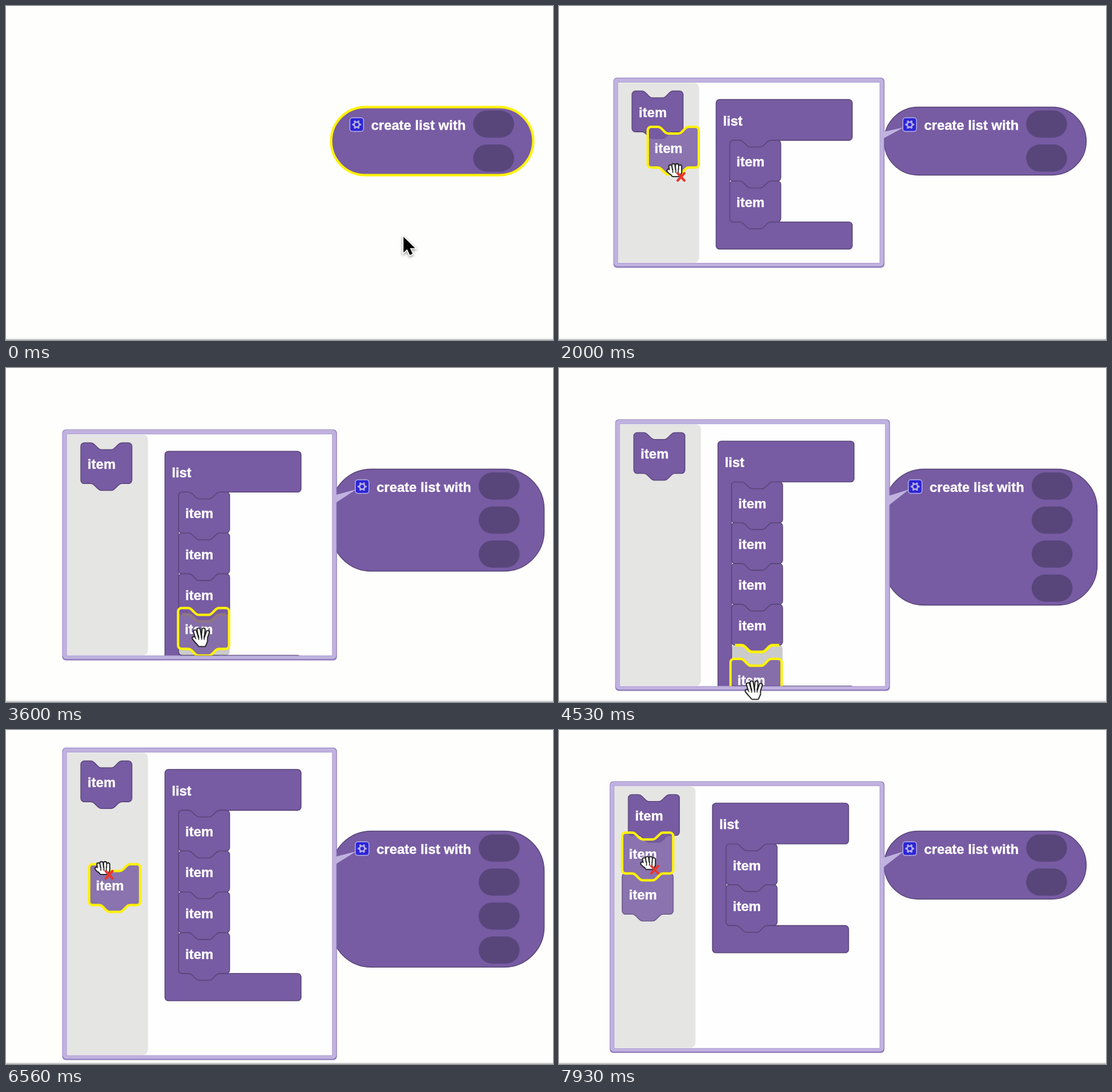
An HTML page with a canvas for the animation above (8 s loop, 900 by 550 pixels).

```html
<!DOCTYPE html>
<html>
<head>
<meta charset="utf-8">
<style>
html, body { margin: 0; width: 100%; height: 100%; overflow: hidden; background: #fefefd; }
canvas { display: block; }
</style>
</head>
<body>
<canvas id="stage" width="900" height="550"></canvas>
<script>
const ctx = document.getElementById('stage').getContext('2d');
const LOOP = 8000, SCALE = 1.4, ROW = 48 * SCALE, LAG = 40, SNAP = 70;
const PURPLE = '#775ba3', EDGE = '#594678', SLOT = '#58467a', YELLOW = '#fff200', LAVENDER = '#c0b2df';

// Block outlines in workspace units
const notch = d => `c${2 * d} 0 ${3 * d} 1 ${4 * d} 2l${4 * d} 4c${d} 1 ${2 * d} 2 ${4 * d} 2h${12 * d}` +
  `c${2 * d} 0 ${3 * d} -1 ${4 * d} -2l${4 * d} -4c${d} -1 ${2 * d} -2 ${4 * d} -2`;
const ITEM = new Path2D(`M0 4a4 4 0 0 1 4-4h8${notch(1)}H56a4 4 0 0 1 4 4V44a4 4 0 0 1-4 4H48${notch(-1)}H4a4 4 0 0 1-4-4z`);
const JOINT = new Path2D(`M4 0h8${notch(1)}H56`);
const listPath = n => new Path2D(`M0 4a4 4 0 0 1 4-4H156a4 4 0 0 1 4 4V44a4 4 0 0 1-4 4H64${notch(-1)}H20a4 4 0 0 0-4 4` +
  `V${44 + 48 * n}a4 4 0 0 0 4 4H156a4 4 0 0 1 4 4v24a4 4 0 0 1-4 4H4a4 4 0 0 1-4-4z`);

// Pointer legs; a drag presses at its start and lets go at `drop`
const go = (start, end, x, y) => ({ start, end, x, y, bend: 0, carry: 0 });
const add = (start, end, x, y, bend, drop) => ({ start, end, x, y, bend, drop, carry: 1, fromPalette: true });
const remove = (start, end, x, y, bend, drop, carry) => ({ start, end, x, y, bend, drop, carry });
const LEGS = [
  go(30, 700, 582, 204),
  go(1260, 1700, 152, 188),
  add(1782, 2302, 313, 403, -24, 2500),
  go(2560, 2880, 161, 171),
  add(3000, 3360, 321, 443, 0, 3670),
  go(3740, 4000, 161, 154),
  add(4150, 4511, 321, 530, 20, 5190),
  go(5700, 6160, 334, 440),
  remove(6325, 6600, 150, 215, 0, 6840, 1),
  go(6920, 7380, 328, 372),
  remove(7475, 7795, 148, 219, -14, LOOP, 2)
];

function pointerAt(t) {
  let x = 654, y = 380;
  for (const leg of LEGS) {
    if (t <= leg.start) break;
    const u = Math.min(1, (t - leg.start) / (leg.end - leg.start)), s = u * u * (3 - 2 * u);
    x += (leg.x - x) * s + leg.bend * Math.sin(Math.PI * s);
    y += (leg.y - y) * s;
  }
  return [x, y];
}

// Replays the drags up to time t
function stateAt(t) {
  let count = 2, rows = 2, drag = null, placed = false, touched = false;
  for (const leg of LEGS) {
    if (!leg.carry || t < leg.start) continue;
    touched = true;
    if (!leg.fromPalette) count -= leg.carry;
    if (t < leg.drop) { drag = leg; continue; }
    if (leg.fromPalette) count++;
    placed = leg.fromPalette;
    if (t >= leg.drop + 50) rows = count;
  }
  return { count, rows, drag, touched, placed: placed && !drag };
}

// The bubble is centred on the gear until it meets the stage bottom
function layout(rows, left) {
  const h = 178.6 + ROW * rows, y = Math.min(118 - 16.8 * (rows - 2), 543.6 - h);
  const listX = left + 169, listY = y + 36;
  return {
    x: left, y, h, w: rows > 2 ? 452 : 446, listX, listY,
    palette: [left + 30.6, y + 22],
    slot: i => [listX + 22.4, listY + ROW * (i + 1)]
  };
}

function shape(path, [x, y], fill, stroke, width = 1.4) {
  ctx.save();
  ctx.translate(x, y);
  ctx.scale(SCALE, SCALE);
  if (fill) { ctx.fillStyle = fill; ctx.fill(path); }
  if (stroke) { ctx.strokeStyle = stroke; ctx.lineWidth = width / SCALE; ctx.stroke(path); }
  ctx.restore();
}

function roundBox(x, y, w, h, r, fill, stroke, width) {
  ctx.beginPath();
  ctx.roundRect(x, y, w, h, r);
  if (fill) { ctx.fillStyle = fill; ctx.fill(); }
  if (stroke) { ctx.strokeStyle = stroke; ctx.lineWidth = width; ctx.stroke(); }
}

function label(text, x, y) {
  ctx.fillStyle = ctx.strokeStyle = '#fff';
  ctx.lineWidth = .4;
  ctx.font = 'bold 22.4px "Liberation Sans", Arial, sans-serif';
  ctx.fillText(text, x, y);
  ctx.strokeText(text, x, y);
}

const blockLabel = (text, [x, y]) => label(text, x + 11.2, y + 43);

function item(at, selected) {
  shape(ITEM, at, PURPLE, selected ? YELLOW : EDGE, selected ? 4 : 1.4);
  blockLabel('item', at);
}

function gear(x, y, hover) {
  const light = hover ? '#e4e0ff' : '#b5abde', blue = hover ? '#1a16ee' : '#2b25d8';
  roundBox(x - 11.3, y - 11.3, 22.6, 22.6, 4.5, blue, light, 1.5);
  ctx.beginPath();
  for (let i = 0; i < 24; i++) {
    const a = (i + .5) * Math.PI / 12, r = (i + 1) % 4 < 2 ? 5.4 : 7.6;
    ctx.lineTo(x + r * Math.sin(a), y - r * Math.cos(a));
  }
  ctx.fillStyle = light;
  ctx.fill();
  ctx.beginPath();
  ctx.arc(x, y, 3, 0, 7);
  ctx.fillStyle = blue;
  ctx.fill();
}

function createBlock(inputs, shift, selected, hover) {
  roundBox(535, 166.5, 332.5 + shift * 2, 56 * inputs, shift ? 66 : 56, PURPLE,
    selected ? YELLOW : EDGE, selected ? 4 : 1.4);
  gear(577 + shift, 195.3, hover);
  label('create list with', 600.8 + shift, 204);
  for (let i = 0; i < inputs; i++) roundBox(768.7 + shift, 172 + 56 * i, 67.2, 44.8, 22.4, SLOT);
}

function bubble({ x, y, w, h }, tipX) {
  const rise = y + h / 2 - 200, right = x + w - 3;
  roundBox(x, y, w, h, 6, '#8e7bbb');
  roundBox(x + .8, y + .8, w - 2, h - 3, 6, LAVENDER);
  ctx.beginPath();
  ctx.moveTo(tipX, 200);
  ctx.lineTo(right, 200 + rise * .1);
  ctx.lineTo(right, 200 + rise * .25);
  ctx.closePath();
  ctx.fillStyle = LAVENDER;
  ctx.fill();
  roundBox(x + 7.5, y + 7.5, w - 15, h - 15, 0, '#fefefe', '#ac9bd1', 1);
  roundBox(x + 8, y + 8.5, 133, h - 17, [0, 8, 8, 0], '#e5e5e4');
}

function carried(n, at) {
  const place = i => [at[0], at[1] + ROW * i];
  ctx.globalAlpha = .82;
  for (let i = n - 1; i >= 0; i--) shape(ITEM, place(i), PURPLE, EDGE);
  ctx.globalAlpha = 1;
  for (let i = 0; i < n; i++) blockLabel('item', place(i));
  shape(ITEM, at, null, YELLOW, 4);
}

function arrow(x, y) {
  ctx.save();
  ctx.translate(x, y);
  const path = new Path2D('M0 0V26L6 20.5L10.5 30L15 28L10.7 18.8H19Z');
  ctx.shadowColor = 'rgba(0,0,0,.45)';
  ctx.shadowBlur = 4;
  ctx.shadowOffsetY = 2;
  ctx.strokeStyle = '#fff';
  ctx.lineWidth = 3;
  ctx.stroke(path);
  ctx.shadowColor = 'transparent';
  ctx.fillStyle = '#000';
  ctx.fill(path);
  ctx.restore();
}

function hand(x, y, closed, cross) {
  ctx.save();
  ctx.translate(x, y);
  ctx.lineCap = ctx.lineJoin = 'round';
  const fingers = new Path2D(closed ?
    'M-7 0L-8-6M-2 0L-3-8M3 0V-8M8 0L8-6M-8 4L-11 1' :
    'M-7 1L-10-9M-2 0L-4-12M3 0L4-12M8 1L11-8M-7 8L-12 2');
  const palm = new Path2D(closed ? 'M-8 0H9V4L6 9H-4L-8 4Z' : 'M-7 2H9V7L6 14H-3L-8 8Z');
  for (const [color, width] of [['#222', 7], ['#fff', 3.3]]) {
    ctx.strokeStyle = ctx.fillStyle = color;
    ctx.lineWidth = width;
    ctx.stroke(fingers);
    ctx.lineWidth = width - 2;
    ctx.stroke(palm);
    ctx.fill(palm);
  }
  ctx.strokeStyle = '#222';
  ctx.lineWidth = 1.5;
  ctx.stroke(new Path2D('M-4-2V4M1-2V4M5-2V4'));
  if (cross) {
    ctx.strokeStyle = '#e8372a';
    ctx.lineWidth = 4;
    ctx.stroke(new Path2D('M4 5L15 17M15 5L4 17'));
  }
  ctx.restore();
}

function draw(t) {
  const [px, py] = pointerAt(t);
  const { count, rows, drag, touched, placed } = stateAt(t);
  const within = (x, y, w, h) => px > x && px < x + w && py > y && py < y + h;
  const home = layout(rows, rows > 2 ? 92.5 : 89.5);

  let at, marker = false;
  if (drag) {
    // Carried blocks trail the pointer and snap to a nearby slot
    const origin = drag.fromPalette ? home.palette : home.slot(count);
    const grip = pointerAt(drag.start), trail = pointerAt(Math.max(drag.start, t - LAG));
    at = origin.map((v, k) => v + trail[k] - grip[k]);
    const slot = home.slot(count);
    marker = Math.hypot(at[0] - slot[0], at[1] - slot[1]) < SNAP;
  }
  const inputs = count + (marker && !drag.fromPalette ? drag.carry : 0);
  const shift = inputs > 2 ? 9 : 0;

  ctx.fillStyle = '#fefefd';
  ctx.fillRect(0, 0, 900, 550);
  ctx.fillStyle = '#cbcbcb';
  ctx.fillRect(0, 548, 900, 2);
  createBlock(inputs, shift, !touched, within(565, 183, 24, 24));
  let overBlock = within(535, 166, 350, 56 * inputs), left = 0;

  if (t >= 1040) {
    const view = layout(rows, rows > 2 ? 83.5 + shift : 89.5);
    const { x, y, w, h, listX, listY, palette, slot } = view;
    left = x;
    bubble(view, 567 + shift);
    ctx.save();
    ctx.beginPath();
    ctx.rect(x + 8, y + 8, w - 16, h - 16);
    ctx.clip();
    item(palette);
    shape(listPath(count + marker), [listX, listY], PURPLE, EDGE);
    blockLabel('list', [listX, listY]);
    for (let i = 0; i < count; i++) item(slot(i), placed && i === count - 1);
    if (marker) {
      shape(ITEM, slot(count), 'rgba(0,0,0,.2)');
      shape(JOINT, slot(count), null, YELLOW, 4.5);
    }
    if (drag) carried(drag.carry, at);
    ctx.restore();
    if (within(x, y, w, h)) {
      overBlock = within(...palette, 84, 78) || within(listX, listY, 224, ROW) ||
        within(listX, listY, 106, ROW * (count + 1)) || within(listX, slot(count)[1], 224, 45);
    }
  }

  const moving = LEGS.some(leg => t > leg.start && t < leg.end);
  if (drag) {
    const cross = px < left + 141;
    hand(px, py, cross || !drag.fromPalette, cross);
  } else if (overBlock || (placed && !moving)) hand(px, py);
  else arrow(px, py);
}

function tick() {
  draw(performance.now() % LOOP);
  requestAnimationFrame(tick);
}
tick();
</script>
</body>
</html>
```
